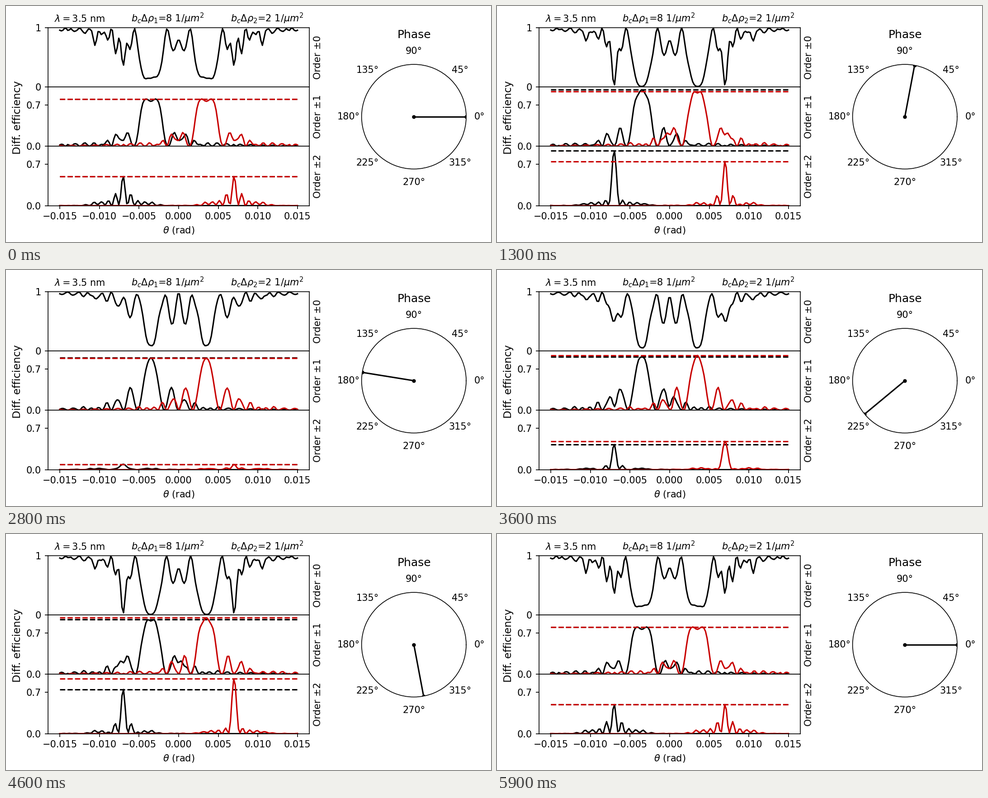
Recreate the animation shown at these times as a matplotlib script. Size 1073x522 px, loop 6000 ms.

```python
import numpy as np
import matplotlib.pyplot as plt
from matplotlib.animation import FuncAnimation

WIDTH, HEIGHT, DPI = 1073, 522, 150
FRAMES, INTERVAL = 60, 100
RED = "#c80000"

# Grating: lengths in micrometres, densities in 1/um^2
WAVELENGTH, PERIOD, THICKNESS = 3.5e-3, 0.5, 340
DENSITY_1, DENSITY_2 = 8, 2
MAX_ORDER = 5

G = 2 * np.pi / PERIOD
BRAGG = WAVELENGTH / (2 * PERIOD)
KAPPA_1 = WAVELENGTH * DENSITY_1 / 2
KAPPA_2 = WAVELENGTH * DENSITY_2 / 2
ORDERS = np.arange(-MAX_ORDER, MAX_ORDER + 1)
THETA = np.linspace(-0.015, 0.015, 150)
PHASES = np.linspace(0, 2 * np.pi, FRAMES)


def efficiencies(phase):
    """Coupled-wave diffraction efficiency, indexed [angle, order]."""
    size = len(ORDERS)
    detuning = G * (np.outer(THETA, ORDERS) + BRAGG * ORDERS**2)
    first = KAPPA_1 * np.eye(size, k=-1)
    second = KAPPA_2 * np.exp(1j * phase) * np.eye(size, k=-2)
    coupling = first + second
    coupling = coupling + coupling.conj().T
    matrices = detuning[:, :, None] * np.eye(size) + coupling
    values, vectors = np.linalg.eigh(matrices)
    start = vectors[:, MAX_ORDER, :].conj()
    weights = np.exp(-1j * values * THICKNESS) * start
    waves = np.einsum("tij,tj->ti", vectors, weights)
    return np.abs(waves) ** 2


def box(left, top, right, bottom):
    """Pixel edges, measured from the top left, as a figure rectangle."""
    return [left / WIDTH, 1 - bottom / HEIGHT,
            (right - left) / WIDTH, (bottom - top) / HEIGHT]


def label(x, y, text, **style):
    return fig.text(x / WIDTH, 1 - y / HEIGHT, text, **style)


plt.rcParams.update({"font.family": "DejaVu Sans", "font.size": 10})
fig = plt.figure(figsize=((WIDTH + 1e-3) / DPI, (HEIGHT + 1e-3) / DPI),
                 dpi=DPI, facecolor="white")

LEFT, RIGHT, TOP, PANEL = 92.6, 671.2, 48.0, 131.23
panels = []
for row in range(3):
    top = TOP + row * PANEL
    ax = fig.add_axes(box(LEFT, top, RIGHT, top + PANEL))
    ax.set_xlim(-0.0165, 0.0165)
    ax.set_ylim(0, 1)
    ax.set_xticks([])
    ax.set_yticks([0, 1] if row == 0 else [0, 0.7])
    ax.set_yticklabels(["0", "1"] if row == 0 else ["0.0", "0.7"])
    label(679.5, top + PANEL / 2, f"Order ±{row}",
          rotation=90, ha="left", va="center")
    panels.append(ax)

panels[2].set_xticks(np.arange(-3, 4) * 0.005)
panels[2].set_xlabel(r"$\theta$ (rad)")
label(14, 247, "Diff. efficiency", rotation=90, ha="left", va="center",
      fontsize=11)

for x, text in [(163, r"$\lambda=3.5$ nm"),
                (357.5, r"$b_c\Delta\rho_1$=8 1/$\mu m^2$"),
                (577.5, r"$b_c\Delta\rho_2$=2 1/$\mu m^2$")]:
    label(x, 35, text, ha="center", va="baseline")

zero_curve, = panels[0].plot(THETA, THETA * 0, color="black", lw=1.5)
curves = []
for step in (1, 2):
    for order, color in ((step, "black"), (-step, RED)):
        curve, = panels[step].plot(THETA, THETA * 0, color=color, lw=1.5)
        peak, = panels[step].plot(THETA[[0, -1]], [0, 0], "--",
                                  color=color, lw=1.5)
        curves.append((order, curve, peak))

CX, CY, RADIUS = 902.4, TOP + 1.5 * PANEL, 115.7
dial = fig.add_axes(box(CX - RADIUS, CY - RADIUS, CX + RADIUS, CY + RADIUS),
                    projection="polar")
dial.set_ylim(0, 1)
dial.set_yticks([])
dial.grid(False)
label(CX, 71, "Phase", fontsize=12, ha="center", va="baseline")
hand, = dial.plot([0, 0], [0, 1], "o-", color="black", lw=1.5, ms=3)


def update(frame):
    phase = PHASES[frame]
    result = efficiencies(phase)
    zero_curve.set_ydata(result[:, MAX_ORDER])
    for order, curve, peak in curves:
        values = result[:, MAX_ORDER + order]
        curve.set_ydata(values)
        peak.set_ydata([values.max()] * 2)
    hand.set_data([phase, phase], [0, 1])
    return [zero_curve, hand] + [line for c in curves for line in c[1:]]


animation = FuncAnimation(fig, update, frames=FRAMES, interval=INTERVAL,
                          repeat=True, repeat_delay=0, blit=False)
plt.show()
```
